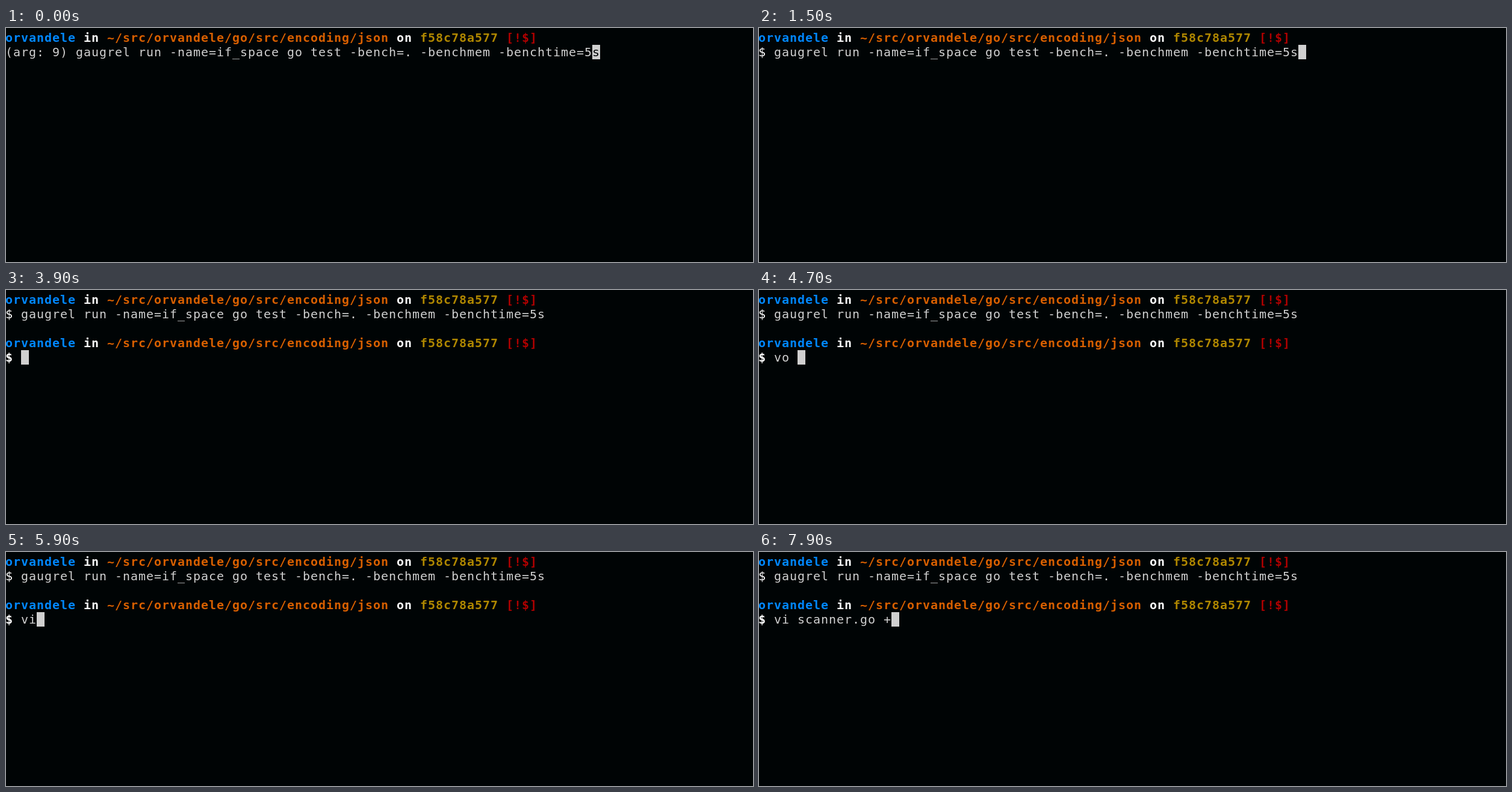
Write an HTML page that moves like this. It is 1241 by 389 pixels and loops after 8 s.

```html
<!DOCTYPE html>
<html lang="en">
<head>
<meta charset="utf-8">
<title>Terminal session</title>
<style>
  html, body { margin: 0; width: 100%; height: 100%; overflow: hidden; background: #000405; }
  svg { display: block; width: 100%; height: 100%; }
  text { font: 20px "DejaVu Sans Mono", monospace; white-space: pre; }
  .bold { font-weight: bold; }
</style>
</head>
<body>
<svg id="screen" viewBox="0 0 1241 389"></svg>
<script>
const NS = "http://www.w3.org/2000/svg";
const LOOP = 8000;
const CELL = { w: 13, h: 24, left: -1, top: 4, base: 19 };
const BG = "#000405", GRAY = "#d0d0d0", WHITE = "#ffffff";

const screen = document.getElementById("screen");
const command = "gaugrel run -name=if_space go test -bench=. -benchmem -benchtime=5s";
const header = [
  ["orvandele", "#0087ff"],
  [" in ", WHITE],
  ["~/src/orvandele/go/src/encoding/json", "#d75f00"],
  [" on ", WHITE],
  ["f58c78a577", "#af8700"],
  [" [!$]", "#af0000"]
];

// Editing the first command: [time, prompt, cursor column]
const edits = [
  [0, "(arg: 9) ", 75],
  [100, "$ ", 59],
  [300, "(arg: 9) ", 66],
  [500, "$ ", 68],
  [1500, "$ ", 69],
  [1700, "$ ", 68],
  [1800, "$ ", 69]
];
const ENTER = 2200, READY = 3900;

// Typing the second command: [time, input]
const typing = [
  [READY, ""],
  [4500, "v"], [4600, "vo"], [4700, "vo "], [4800, "vo s"], [4900, "vo sc"],
  [5200, "vo s"], [5300, "vo "], [5500, "vo"], [5700, "v"],
  [5900, "vi"], [6000, "vi "], [6100, "vi s"], [6200, "vi sca"], [6300, "vi scan"],
  [6500, "vi scanne"], [6700, "vi scanner."], [6900, "vi scanner.g"],
  [7000, "vi scanner.go"], [7300, "vi scanner.go "], [7900, "vi scanner.go +"]
];

const colX = col => CELL.left + col * CELL.w;
const rowY = row => CELL.top + row * CELL.h;
const stepAt = (steps, t) => steps.filter(s => s[0] <= t).pop();

function add(name, attrs, content = "") {
  const node = document.createElementNS(NS, name);
  for (const key in attrs) node.setAttribute(key, attrs[key]);
  node.textContent = content;
  screen.appendChild(node);
}

function write(str, row, col, fill, bold) {
  if (!str) return;
  const x = [...str].map((_, i) => colX(col + i)).join(" ");
  add("text", { x, y: rowY(row) + CELL.base, fill, class: bold ? "bold" : "" }, str);
}

function drawHeader(row) {
  let col = 0;
  for (const [str, fill] of header) {
    write(str, row, col, fill, true);
    col += str.length;
  }
}

function drawCursor(row, col, char = "") {
  add("rect", { x: colX(col), y: rowY(row), width: CELL.w, height: CELL.h, fill: GRAY });
  write(char, row, col, BG);
}

function render(t) {
  screen.replaceChildren();
  drawHeader(0);

  const [, prompt, cursor] = stepAt(edits, t);
  write(prompt, 1, 0, prompt[0] === "$" ? WHITE : GRAY);
  write(command, 1, prompt.length, GRAY);

  if (t < ENTER) {
    drawCursor(1, cursor, command[cursor - prompt.length]);
  } else if (t < READY) {
    drawCursor(2, 0);
  } else {
    const [, input] = stepAt(typing, t);
    drawHeader(3);
    write("$", 4, 0, WHITE, true);
    write(input, 4, 2, GRAY);
    drawCursor(4, 2 + input.length);
  }
}

const start = performance.now();
function tick() {
  render((performance.now() - start) % LOOP);
  requestAnimationFrame(tick);
}
tick();
</script>
</body>
</html>
```
